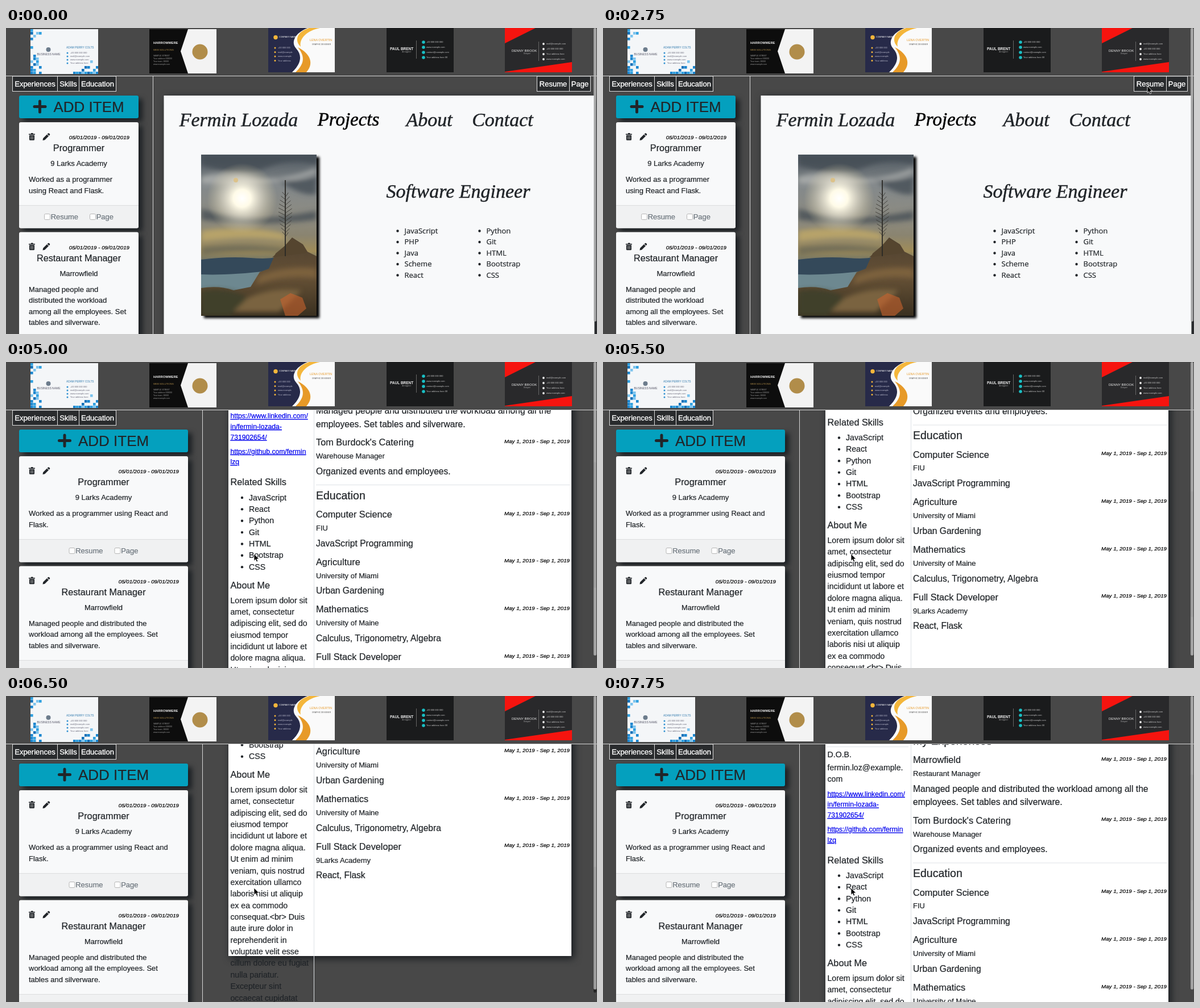
Write an HTML page that moves like this. It is 1039 by 539 pixels and loops after 8 s.

```html
<!DOCTYPE html>
<html lang="en">
<head>
<meta charset="utf-8">
<title>Resume builder</title>
<style>
html, body { margin: 0; width: 100%; height: 100%; overflow: hidden; background: #484848; }
svg { display: block; font-family: "Liberation Sans", Arial, sans-serif; }
text { white-space: pre; }
.script { font-family: "Dancing Script", "Liberation Serif", serif; font-style: italic; }
.open { font-family: "Open Sans", "Noto Sans", sans-serif; }
.raised { filter: drop-shadow(7px 6px 5px #1b1f23); }
.sheet { filter: drop-shadow(4px 4px 7px #15191d); }
.photo { filter: drop-shadow(5px 4px 2px #000); }
</style>
</head>
<body>
<svg id="stage" width="1039" height="539" viewBox="0 0 1039 539"></svg>
<script>
const LOOP = 8000, RESUME_AT = 3500;
const INK = '#212529';

const attrs = o => Object.entries(o).map(([k, v]) => `${k}="${v}"`).join(' ');
const rect = (x, y, width, height, fill, o = {}) =>
  `<rect ${attrs({ x, y, width, height, fill, ...o })}/>`;
const path = (d, fill, o = {}) => `<path ${attrs({ d, fill, ...o })}/>`;
const dot = (cx, cy, r, fill) => `<circle ${attrs({ cx, cy, r, fill })}/>`;
const group = (content, o = {}) => `<g ${attrs(o)}>${content}</g>`;
const hLine = (x1, x2, y, color) => path(`M${x1} ${y}H${x2}`, 'none', { stroke: color });
const vLine = (x, y1, y2, color) => path(`M${x} ${y1}V${y2}`, 'none', { stroke: color });
const escapeText = s => s.replace(/&/g, '&amp;').replace(/</g, '&lt;');

// y is the middle of the capital letters; a thin stroke gives the type its weight
function text(x, y, size, s, { fill = INK, ...o } = {}) {
  const weight = size > 9 ? { stroke: fill, 'stroke-width': 0.22 } : {};
  const at = { x, y: (y + size * 0.355).toFixed(2), 'font-size': size, fill };
  return `<text ${attrs({ ...at, ...weight, ...o })}>${escapeText(s)}</text>`;
}
const middle = { 'text-anchor': 'middle' };
const lines = (x, y, step, size, list, o) =>
  list.map((s, i) => text(x, y + i * step, size, s, o)).join('');

function random(seed) {
  return () => (seed = (seed * 16807) % 2147483647) / 2147483647;
}

// ---------- business cards ----------
function contactRows(x, y, step, iconColor, color, list, r = 1.5) {
  return list.map((s, i) => dot(x, y + i * step, r, iconColor) +
    text(x + 5, y + i * step, 3.9, s, { fill: color })).join('');
}

function blueCard() {
  const rnd = random(41), blues = ['#1b86cf', '#2fa0e0', '#7cc4ee', '#0d6fb8'];
  let squares = '';
  for (let row = 0; row < 16; row++) {
    for (let col = 0; col < 24; col++) {
      const corner = Math.min(col + row * 1.3, (23 - col) * 0.6 + (15 - row) * 1.4, col * 1.5 + (15 - row) * 0.6);
      if (rnd() < 1 - corner / 7)
        squares += rect(43 + col * 5, 2 + row * 5, 4.6, 4.6, blues[Math.floor(rnd() * 4)]);
    }
  }
  return rect(43, 2, 119, 79, '#f4f6f8') +
    `<clipPath id="blue">${rect(43, 2, 119, 79, '#000')}</clipPath>` +
    group(squares, { 'clip-path': 'url(#blue)' }) +
    dot(74.5, 38, 4, '#6c7c8c') +
    text(75, 46.5, 5, 'BUSINESS NAME', { ...middle, fill: '#556' }) +
    text(106, 34.5, 4.8, 'ADAM PERRY COLTS', { fill: '#2d78ad' }) +
    contactRows(108, 44, 6, '#2f90d0', '#667', ['+00 000 000 000', 'mail@example.com', 'www.example.com', 'Your address here']);
}

function goldCard() {
  return rect(252, 2, 118, 78, '#0d0d0d') +
    path('M320 2H370V80H320L307 41Z', '#f3f3f3') +
    dot(341, 42, 13.5, '#b18d4a') +
    text(259, 25.5, 5.8, 'HARROWMERE', { fill: '#eee', 'font-weight': 'bold' }) +
    text(259, 38, 4.3, 'WEB SOLUTIONS', { fill: '#b18d4a' }) +
    lines(259, 49, 5, 3.5, ['SAMPLE STREET', 'Your address 000000', 'Your town, 00000', 'www.example.com'], { fill: '#999' });
}

function orangeCard() {
  return rect(461, 0, 117, 78, '#272a49') +
    path('M530 0C508 9 500 25 510 36C522 49 518 64 503 78H578V0Z', '#fafafa') +
    path('M552 0C527 5 515 20 518 33C506 22 512 6 533 0Z', '#f4b63b') +
    path('M513 34C537 46 541 64 528 78H509C525 63 526 50 513 34Z', '#e79a28') +
    dot(474, 16.5, 3.7, '#f4b63b') +
    text(480, 16, 3.7, 'COMPANY NAME', { fill: '#fff' }) +
    text(534, 21.5, 5.4, 'LENA OVERTIN', { fill: '#e79a28' }) +
    text(538, 28.5, 3.3, 'GRAPHIC DESIGNER', { fill: '#555' }) +
    contactRows(473, 35, 7.5, '#f4b63b', '#bbc', ['+00 000 000', 'mail@example', 'www.example', 'Your address']);
}

function tealCard() {
  return rect(669, 0, 118, 78, '#1a1b1c') +
    text(675, 36.5, 6.5, 'PAUL BRENT', { fill: '#eee', 'font-weight': 'bold' }) +
    text(696, 42, 4.2, 'designer', { fill: '#aaa' }) +
    vLine(721.5, 22, 54, '#666') +
    contactRows(734, 25, 9, '#19bfc4', '#ccc', ['+00 000 000 000', 'www.example.com', 'contact@example.com', 'Your address here 00'], 2.8);
}

function redCard() {
  return rect(877, 0, 118, 78, '#29292b') +
    path('M877 0H931L877 27Z M877 77L995 60V78H877Z', '#f6140f') +
    text(889, 39.5, 6, 'DENNY BROOK', { fill: '#eee' }) +
    text(910, 45, 3, 'Designer', { fill: '#aaa' }) +
    vLine(936.5, 24, 58, '#666') +
    contactRows(945, 28, 9, '#eee', '#ccc', ['mail@example.com', '+00 000 000 000', 'Your address here', 'www.example.com'], 1.9);
}

// ---------- left panel ----------
const tab = (x, width, label) =>
  rect(x + 0.5, 85, width, 26.5, '#292b2d', { stroke: '#ddd' }) +
  text(x + width / 2 + 0.5, 98.5, 13, label, { ...middle, fill: '#fff', 'stroke-width': 0.35 });

const trash = y => path(`M40 ${y - 5}H43.5L44.5 ${y - 6.5}H47L48 ${y - 5}H51V${y - 3.6}H40Z M41 ${y - 2.8}H50V${y + 5}Q50 ${y + 6.3} 48.7 ${y + 6.3}H42.3Q41 ${y + 6.3} 41 ${y + 5}Z`, INK) +
  path(`M43.5 ${y - 1}V${y + 4.5}M45.5 ${y - 1}V${y + 4.5}M47.5 ${y - 1}V${y + 4.5}`, 'none', { stroke: '#ccc', 'stroke-width': 0.7 });
const pencil = y => path(`M64.5 ${y + 6.5}L65.2 ${y + 2.8}L72 ${y - 4}L75 ${y - 1}L68.2 ${y + 5.8}Z M72.7 ${y - 4.7}L74 ${y - 6}Q75 ${y - 6.8} 76 ${y - 5.8}L76.9 ${y - 4.9}Q77.7 ${y - 4} 76.9 ${y - 3}L75.7 ${y - 1.7}Z`, INK);

const checkbox = (x, y, label) =>
  rect(x + 0.5, y - 4.5, 10, 10, '#fff', { rx: 2, stroke: '#b5b5b5' }) +
  text(x + 11.7, y, 13, label, { fill: '#6c757d' });

function itemCard(y, height, footer, right, title, place, body) {
  const mid = (23 + right) / 2, width = right - 23;
  return group(rect(23, y, width, height, '#f8f9fa', { rx: 3 }), { class: 'raised' }) +
    path(`M23 ${footer}H${right}V${y + height - 3}Q${right} ${y + height} ${right - 3} ${y + height}H26Q23 ${y + height} 23 ${y + height - 3}Z`, '#f0f1f2') +
    hLine(23, right, footer, '#dcdddf') +
    trash(y + 25.5) + pencil(y + 25.5) +
    text(right - 16, y + 27, 9.75, '05/01/2019 - 09/01/2019', { 'text-anchor': 'end', 'font-style': 'italic', fill: '#000' }) +
    text(mid, y + 45.5, 16.25, title, middle) +
    text(mid, y + 72.5, 13, place, middle) +
    lines(40, y + 100.5, 19.5, 13, body) +
    checkbox(mid - 61, footer + 19.5, 'Resume') + checkbox(mid + 19, footer + 19.5, 'Page');
}

function panel(right, programmer, manager) {
  const mid = (23 + right) / 2, plus = mid - 68.5;
  return vLine(right + 25.5, 85, 539, '#d8d8d8') +
    tab(11, 79, 'Experiences') + tab(90, 38, 'Skills') + tab(128, 65, 'Education') +
    group(rect(23, 119, right - 23, 40, '#04a0be', { rx: 3 }), { class: 'raised' }) +
    path(`M${plus - 9.5} 138.5H${plus + 9.5}M${plus} 129V148`, 'none', { stroke: INK, 'stroke-width': 5, 'stroke-linecap': 'round' }) +
    text(mid - 44.5, 139, 26, 'ADD ITEM') +
    itemCard(166, 186.5, 312.5, right, 'Programmer', '9 Larks Academy', programmer) +
    itemCard(359.5, 230, 467 + manager.length * 19.5, right, 'Restaurant Manager', 'Marrowfield', manager);
}

// ---------- personal page ----------
function photo() {
  const branches = Array.from({ length: 11 }, (_, i) => {
    const y = 288 + i * 7, reach = 3 + 9 * Math.sin((i + 1) / 12 * Math.PI);
    return `M491 ${y + 7}l${-reach} -6M491 ${y + 10}l${reach} -8`;
  }).join('');
  return `<defs>
    <linearGradient id="sky" x2="0" y2="1">
      <stop offset="0" stop-color="#4f5860"/><stop offset=".2" stop-color="#84898b"/>
      <stop offset=".4" stop-color="#8d8b80"/><stop offset=".5" stop-color="#8a8470"/>
      <stop offset=".6" stop-color="#a08c58"/><stop offset=".66" stop-color="#6d7268"/>
    </linearGradient>
    <radialGradient id="sun"><stop offset="0" stop-color="#fff"/><stop offset=".25" stop-color="#fffbe8"/>
      <stop offset=".55" stop-color="#eee8d4" stop-opacity=".6"/><stop offset="1" stop-color="#d8cda6" stop-opacity="0"/></radialGradient>
    <linearGradient id="rock" x2="0" y2="1"><stop offset="0" stop-color="#4d4030"/>
      <stop offset=".5" stop-color="#665136"/><stop offset="1" stop-color="#3a3020"/></linearGradient>
    <clipPath id="frame">${rect(343, 223, 203, 284, '#000')}</clipPath>
    <filter id="soft"><feGaussianBlur stdDeviation="4"/></filter></defs>` +
    group(rect(343, 223, 203, 284, '#667'), { class: 'photo' }) +
    group(
      rect(343, 223, 203, 284, 'url(#sky)') +
      group(path('M343 223H546V240Q500 228 458 246T343 242Z M343 318Q380 330 420 334T546 322V338Q450 350 343 338Z M470 262Q515 275 546 262V292Q520 300 470 262Z', '#424a53', { opacity: 0.75 }) +
        path('M343 262Q380 250 430 262T546 246V256Q470 282 343 274Z', '#c2c4c0', { opacity: 0.6 }) +
        path('M343 357Q420 346 490 362V374Q420 366 343 376Z', '#c2aa68', { opacity: 0.8 }) +
        path('M343 386Q420 378 490 388V396Q420 390 343 400Z', '#5f6058', { opacity: 0.7 }), { filter: 'url(#soft)' }) +
      dot(415, 300, 62, 'url(#sun)') +
      path('M343 408Q390 402 430 405T480 401V440H343Z', '#34495a') +
      path('M343 434Q390 436 460 428V507H343Z', '#6d8890') +
      path('M343 458Q375 453 400 462L430 456L446 430L462 424L474 397L490 384L503 369L522 381L530 394L546 402V507H343Z', 'url(#rock)') +
      group(path('M343 463Q390 455 425 475L395 507H343Z', '#40402c') +
        path('M446 437Q490 418 546 424V440Q490 432 440 452Z', '#7d623e') +
        path('M425 475Q470 455 520 462L480 500H400Z', '#7a6340'), { filter: 'url(#soft)' }) +
      path('M468 404L490 384L503 370L521 382L529 396Q500 400 468 404Z', '#55452f') +
      path('M491 268V402', 'none', { stroke: '#2b2a26', 'stroke-width': 1.8 }) +
      path(branches, 'none', { stroke: '#35342f', 'stroke-width': 0.8 }) +
      path('M482 478L500 467L521 475L528 494L513 507H491Z', '#c9632d', { opacity: 0.6 }) +
      dot(404, 268, 4, '#dcc28a'),
      { 'clip-path': 'url(#frame)' });
}

const bullets = (x, y, step, size, list, o) => list.map((s, i) =>
  dot(x - 12, y + i * step + 0.5, 2.2, INK) + text(x, y + i * step, size, s, o)).join('');

const viewTabs = () => tab(933, 57, 'Resume') + tab(990, 37, 'Page');

function personalPage() {
  const script = { ...middle, class: 'script', 'stroke-width': 0.5 }, open = { class: 'open' };
  return group(rect(277.5, 119, 757, 460, '#f8f9fa'), { class: 'sheet' }) + viewTabs() +
    text(409, 160.5, 34, 'Fermin Lozada', script) +
    text(602, 160.5, 33, 'Projects', { ...script, fill: '#000' }) +
    text(744, 160.5, 34, 'About', script) +
    text(873, 160.5, 34, 'Contact', script) +
    photo() +
    text(795, 286.5, 34, 'Software Engineer', script) +
    bullets(700.5, 357, 19.5, 13, ['JavaScript', 'PHP', 'Java', 'Scheme', 'React'], open) +
    bullets(844.5, 357, 19.5, 13, ['Python', 'Git', 'HTML', 'Bootstrap', 'CSS'], open);
}

// ---------- resume ----------
const RULE = '#dee2e6';
const ABOUT = ['Lorem ipsum dolor sit', 'amet, consectetur', 'adipiscing elit, sed do', 'eiusmod tempor',
  'incididunt ut labore et', 'dolore magna aliqua.', 'Ut enim ad minim', 'veniam, quis nostrud',
  'exercitation ullamco', 'laboris nisi ut aliquip', 'ex ea commodo', 'consequat.<br> Duis',
  'aute irure dolor in', 'reprehenderit in', 'voluptate velit esse', 'cillum dolore eu fugiat',
  'nulla pariatur.', 'Excepteur sint', 'occaecat cupidatat', 'non proident, sunt in',
  'culpa qui officia', 'deserunt mollit anim', 'id est laborum.'];

function entry(y, title, place, ...body) {
  return text(545, y, 16.25, title) +
    text(991, y - 2, 9.75, 'May 1, 2019 - Sep 1, 2019', { 'text-anchor': 'end', 'font-style': 'italic', fill: '#000' }) +
    text(545, y + 24, 13, place) + lines(545, y + 50.8, 23.2, 15.6, body);
}

function resume() {
  const link = { fill: '#0000ee', 'text-decoration': 'underline' };
  const studies = [['Computer Science', 'FIU', 'JavaScript Programming'],
    ['Agriculture', 'University of Miami', 'Urban Gardening'],
    ['Mathematics', 'University of Maine', 'Calculus, Trigonometry, Algebra'],
    ['Full Stack Developer', '9Larks Academy', 'React, Flask']];
  return group(rect(391, 119, 603, 779, '#fff'), { class: 'sheet' }) + viewTabs() +
    vLine(541.5, 119, 1060, RULE) +
    lines(466, 144.5, 31, 21.1, ['Fermin', 'Lozada'], middle) +
    hLine(394, 537, 197.5, RULE) +
    text(394.5, 211, 14.15, 'D.O.B.') +
    lines(394.5, 234, 20.4, 14.15, ['fermin.loz@example.', 'com']) +
    lines(394.5, 280.5, 18.6, 12.15, ['https://www.linkedin.com/', 'in/fermin-lozada-', '731902654/'], link) +
    lines(394.5, 343, 18.6, 12.15, ['https://github.com/fermin', 'lzq'], link) +
    text(394.5, 397, 16.25, 'Related Skills') +
    bullets(427, 424, 20.36, 14.15, ['JavaScript', 'React', 'Python', 'Git', 'HTML', 'Bootstrap', 'CSS']) +
    text(394.5, 578.5, 16.25, 'About Me') +
    lines(394.5, 605, 20.36, 14.15, ABOUT) +
    text(768, 138.5, 14.15, '"Helping companies reach their goals by serving them great mate."', { ...middle, 'stroke-width': 0 }) +
    hLine(545, 991, 168.5, RULE) +
    text(545, 187, 19.5, 'My Experiences') +
    entry(220.5, 'Marrowfield', 'Restaurant Manager', 'Managed people and distributed the workload among all the', 'employees. Set tables and silverware.') +
    entry(327, "Tom Burdock's Catering", 'Warehouse Manager', 'Organized events and employees.') +
    hLine(545, 991, 402, RULE) +
    text(545, 420.5, 19.5, 'Education') +
    studies.map((s, i) => entry(453.8 + i * 83.7, ...s)).join('');
}

// ---------- scene ----------
const stage = document.getElementById('stage');
stage.innerHTML =
  `<defs><clipPath id="body">${rect(0, 85, 1039, 454, '#000')}</clipPath></defs>` +
  rect(0, 0, 1039, 539, '#484848') +
  group(
    group(personalPage() + panel(233,
      ['Worked as a programmer', 'using React and Flask.'],
      ['Managed people and', 'distributed the workload', 'among all the employees. Set', 'tables and silverware.']), { id: 'pageView' }) +
    group(group(resume(), { id: 'scroller' }) + panel(320,
      ['Worked as a programmer using React and', 'Flask.'],
      ['Managed people and distributed the', 'workload among all the employees. Set', 'tables and silverware.']), { id: 'resumeView' }),
    { 'clip-path': 'url(#body)' }) +
  blueCard() + goldCard() + orangeCard() + tealCard() + redCard() +
  hLine(0, 1039, 84.5, '#d8d8d8') +
  rect(1033, 85, 5, 222, '#000', { id: 'thumb', rx: 2.5, opacity: 0.5 }) +
  rect(1033, 0, 5, 517, '#bbb', { rx: 2.5, opacity: 0.8 }) +
  path('M0 0V12.4L2.8 9.8L4.6 14L6.8 13.1L5 9H8.8Z', '#000', { id: 'cursor', stroke: '#fff', 'stroke-width': 0.8 });

const [pageView, resumeView, scroller, thumb, cursor] =
  ['pageView', 'resumeView', 'scroller', 'thumb', 'cursor'].map(id => document.getElementById(id));

const CURSOR = [[750, 625, 55], [1750, 826, 99], [2000, 901, 90], [2250, 941, 89],
  [2500, 954, 106], [2750, 957, 102], [4000, 689, 196], [4250, 436, 338]];
const SCROLL_START = 4750, SCROLL_STEP = 250;
const SCROLL = [90, 185.5, 242, 291, 329, 357, 402, 440, 474, 445, 350, 230, 108];

const show = (node, on) => node.setAttribute('display', on ? 'inline' : 'none');

function render(t) {
  const onResume = t >= RESUME_AT;
  show(pageView, !onResume);
  show(resumeView, onResume);

  const scroll = SCROLL[Math.floor((t - SCROLL_START) / SCROLL_STEP)] || 0;
  scroller.setAttribute('transform', `translate(0 ${-scroll})`);
  show(thumb, scroll > 0);
  thumb.setAttribute('y', 85 + scroll * 0.49);

  const spot = CURSOR.filter(k => k[0] <= t).pop();
  show(cursor, !!spot);
  if (spot) cursor.setAttribute('transform', `translate(${spot[1]} ${spot[2]})`);
}

const start = performance.now();
function tick() {
  render((performance.now() - start) % LOOP);
  requestAnimationFrame(tick);
}
render(0);
requestAnimationFrame(tick);
</script>
</body>
</html>
```
